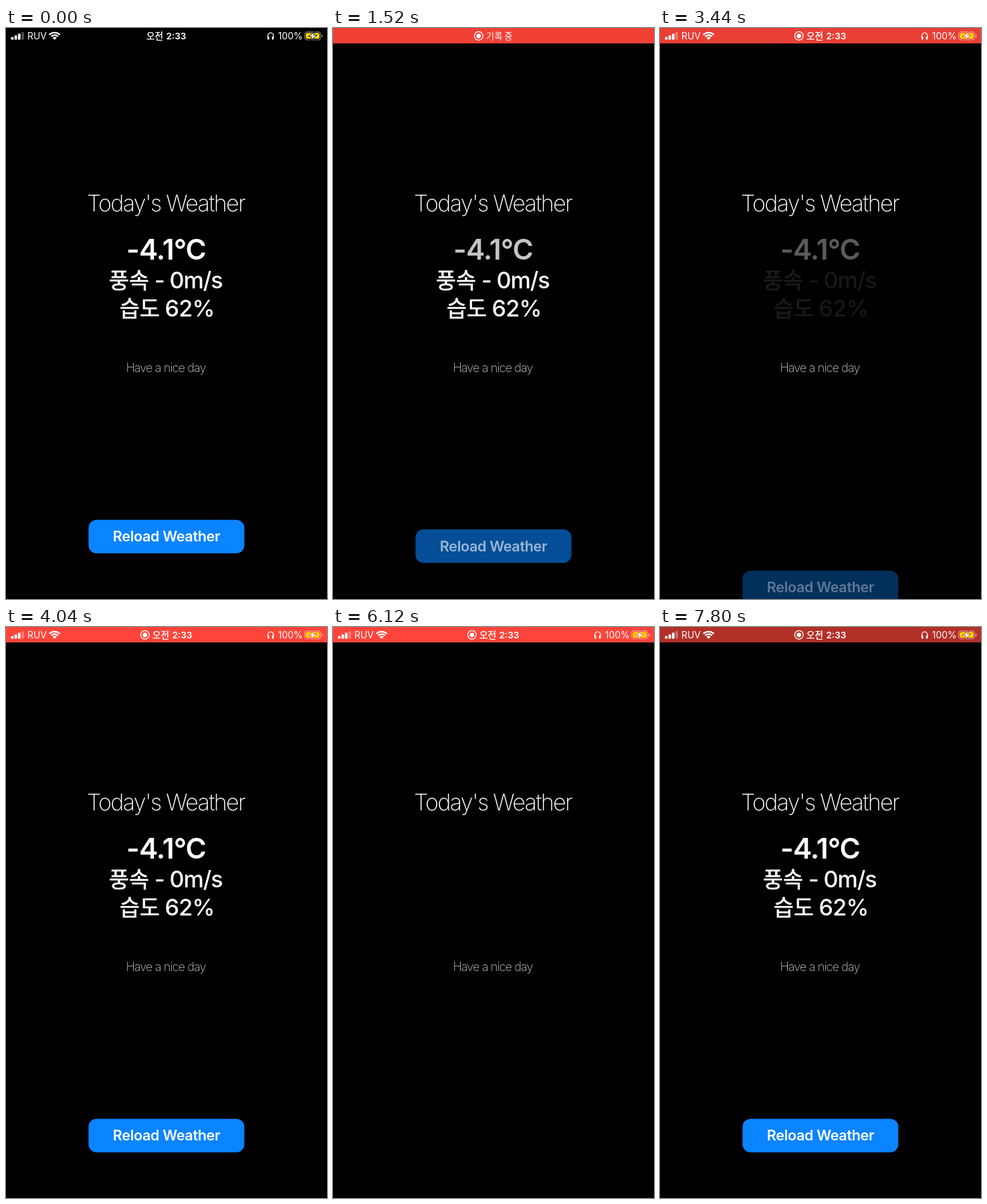
Animation of 480 by 853 pixels, one loop 7.84 s. Source, as an HTML page with a canvas:

```html
<!DOCTYPE html>
<html lang="ko">
<head>
<meta charset="utf-8">
<title>Today's Weather</title>
<style>
  html, body { margin: 0; width: 100%; height: 100%; overflow: hidden; background: #000; }
  canvas { display: block; width: 480px; height: 853px; }
</style>
</head>
<body>
<canvas id="stage"></canvas>
<script>
const W = 480, H = 853, LOOP = 7840;
const LATIN = 'Inter, "Noto Sans", sans-serif';
const HANGUL = '"Noto Sans CJK KR", "Noto Sans CJK JP", "Noto Sans CJK", sans-serif';
const OUT = [1436, 5270], WAIT = 1860, MOVE = 350, PRESS = 140, DROP = 118;
const LAG = 90;  // the lower readings fade a little after the temperature

const canvas = document.getElementById('stage');
const dpr = window.devicePixelRatio || 1;
canvas.width = Math.round(W * dpr);
canvas.height = Math.round(H * dpr);
const ctx = canvas.getContext('2d');

const clamp = v => Math.min(1, Math.max(0, v));

// cubic-bezier(.42, 0, .58, 1)
function ease(p) {
  if (p <= 0 || p >= 1) return clamp(p);
  let lo = 0, hi = 1;
  for (let i = 0; i < 24; i++) {
    const s = (lo + hi) / 2, r = 1 - s;
    if (3 * r * r * s * 0.42 + 3 * r * s * s * 0.58 + s * s * s < p) lo = s;
    else hi = s;
  }
  return lo * lo * (3 - 2 * lo);
}
const ramp = (t, start, length) => ease((t - start) / length);

function faded(alpha, draw) {
  if (alpha <= 0) return;
  ctx.save();
  ctx.globalAlpha *= alpha;
  draw();
  ctx.restore();
}

function text(str, x, y, size, weight, { family = LATIN, align = 'left', track = 0, color = '#fff', extra = 0 } = {}) {
  ctx.font = `${weight} ${size}px ${family}`;
  ctx.letterSpacing = track * size + 'px';
  ctx.textAlign = align;
  ctx.fillStyle = ctx.strokeStyle = color;
  ctx.fillText(str, x, y);
  if (extra) {
    ctx.lineWidth = extra;
    ctx.lineJoin = 'round';
    ctx.strokeText(str, x, y);
  }
}

function box(x, y, w, h, r, fill) {
  ctx.beginPath();
  ctx.roundRect(x, y, w, h, r);
  ctx.fillStyle = fill;
  ctx.fill();
}

function poly(...pts) {
  ctx.beginPath();
  for (let i = 0; i < pts.length; i += 2) ctx.lineTo(pts[i], pts[i + 1]);
  ctx.closePath();
}

function signal() {
  for (let i = 0; i < 4; i++) {
    const h = 4 + i * 2.5;
    box(7.5 + i * 5.2, 17.5 - h, 3.8, h, 1, i < 3 ? '#fff' : 'rgba(255,255,255,.3)');
  }
}

function wifi() {
  const cx = 72.7, cy = 17.8, half = 0.8;
  ctx.strokeStyle = ctx.fillStyle = '#fff';
  ctx.lineWidth = 2.3;
  for (const r of [11, 7.2]) {
    ctx.beginPath();
    ctx.arc(cx, cy, r, -Math.PI / 2 - half, -Math.PI / 2 + half);
    ctx.stroke();
  }
  ctx.beginPath();
  ctx.moveTo(cx, cy);
  ctx.arc(cx, cy, 4.6, -Math.PI / 2 - half, -Math.PI / 2 + half);
  ctx.fill();
}

function headphones() {
  ctx.strokeStyle = '#fff';
  ctx.lineWidth = 1.2;
  ctx.beginPath();
  ctx.moveTo(392.2, 16.5);
  ctx.bezierCurveTo(387.5, 4, 403.9, 4, 399.2, 16.5);
  ctx.stroke();
  box(391.3, 12.4, 2.3, 5, 1, '#fff');
  box(397.8, 12.4, 2.3, 5, 1, '#fff');
}

function battery(back) {
  ctx.beginPath();
  ctx.roundRect(446.6, 5.9, 24, 11.8, 3.6);
  ctx.strokeStyle = 'rgba(255,255,255,.5)';
  ctx.lineWidth = 1.1;
  ctx.stroke();
  box(448.3, 7.6, 20.6, 8.4, 2, '#ffd60a');
  box(471.9, 9.7, 1.5, 4.2, 1, 'rgba(255,255,255,.5)');
  poly(460.9, 6.4, 453.4, 12.5, 457.9, 12.5, 456.3, 17.4, 463.8, 11.1, 459.3, 11.1);
  ctx.strokeStyle = back;
  ctx.lineWidth = 1.6;
  ctx.stroke();
  ctx.fillStyle = '#fff';
  ctx.fill();
}

function record(x) {
  ctx.beginPath();
  ctx.arc(x, 11.8, 6.4, 0, 7);
  ctx.strokeStyle = '#fff';
  ctx.lineWidth = 1.3;
  ctx.stroke();
  ctx.beginPath();
  ctx.arc(x, 11.8, 3.4, 0, 7);
  ctx.fillStyle = '#fff';
  ctx.fill();
}

function clock(x) {
  text('오전', x, 17, 13.5, 500, { family: HANGUL, extra: 0.4 });
  text('2:33', x + 59.5, 17, 13.6, 600, { align: 'right' });
}

function statusBar(t) {
  const start = ramp(t, 100, 330), stop = ramp(t, 7675, 350);
  const pulse = 0.93 + 0.07 * Math.cos((t - 4040) / 2080 * 2 * Math.PI);
  const level = pulse * start * (1 - stop);
  const back = `rgb(${[255, 69, 58].map(c => Math.round(c * level))})`;
  ctx.fillStyle = back;
  ctx.fillRect(0, 0, W, 23);

  const swap = ramp(t, 3000, 300);
  const sides = t < 2000 ? 1 - start : ramp(t, 3200, 250);
  faded(sides, () => {
    signal();
    text('RUV', 32, 17, 13.8, 400);
    wifi();
    headphones();
    text('100%', 443.6, 17, 13.9, 400, { align: 'right' });
    battery(back);
  });
  faded(1 - start, () => clock(210));
  faded(start, () => record(217.8 - 10 * swap));
  faded(start * (1 - swap), () =>
    text('기록 중', 229 - 10 * swap, 17, 13.2, 400, { family: HANGUL }));
  faded(swap, () => clock(229 - 10 * swap));
}

// Place, opacity and press state of the readings and the button.
function panel(t) {
  const state = { drop: 0, alpha: 1, late: 1, press: 1 };
  for (const out of OUT) {
    if (t < out - PRESS || t > out + WAIT + MOVE) continue;
    const back = t >= out + WAIT;
    const from = back ? out + WAIT : out;
    const e = ramp(t, from, MOVE), late = ramp(t, from + LAG, MOVE - LAG);
    state.drop = DROP * (back ? 1 - e : e);
    state.alpha = back ? e : (1 - e) ** 2;
    state.late = back ? late : 1 - late;
    state.press = back ? 1 : 0.77;
  }
  return state;
}

function temperature() {
  text('-4.1°C', 239.5, 346, 42.5, 600, { align: 'center', track: -0.022 });
}

function details() {
  const hangul = { family: HANGUL, extra: 0.7 };
  text('풍속', 154, 388.5, 32.5, 500, hangul);
  text('- 0m/s', 222, 388.7, 34.2, 550, { track: -0.034 });
  text('습도', 170, 430.5, 32.5, 500, hangul);
  text('62%', 237.5, 430.6, 34.2, 550, { track: -0.025 });
}

function button(drop) {
  box(123.4, 734.7 + drop, 233, 50, 12, '#0a84ff');
  text('Reload Weather', 240, 767.3 + drop, 21.6, 600, { align: 'center', track: -0.017 });
}

function draw(t) {
  ctx.setTransform(dpr, 0, 0, dpr, 0, 0);
  ctx.globalAlpha = 1;
  ctx.fillStyle = '#000';
  ctx.fillRect(0, 0, W, H);
  statusBar(t);
  text("Today's Weather", 239, 274.2, 34.2, 200, { align: 'center', track: -0.05 });
  text('Have a nice day', 239, 513.8, 18, 200, { align: 'center', track: -0.048, color: '#d0d0d0' });
  const p = panel(t);
  faded(p.alpha, temperature);
  faded(p.late, details);
  faded(p.alpha * p.press, () => button(p.drop));
}

const began = performance.now();
function tick() {
  draw((performance.now() - began) % LOOP);
  requestAnimationFrame(tick);
}
tick();
</script>
</body>
</html>
```
